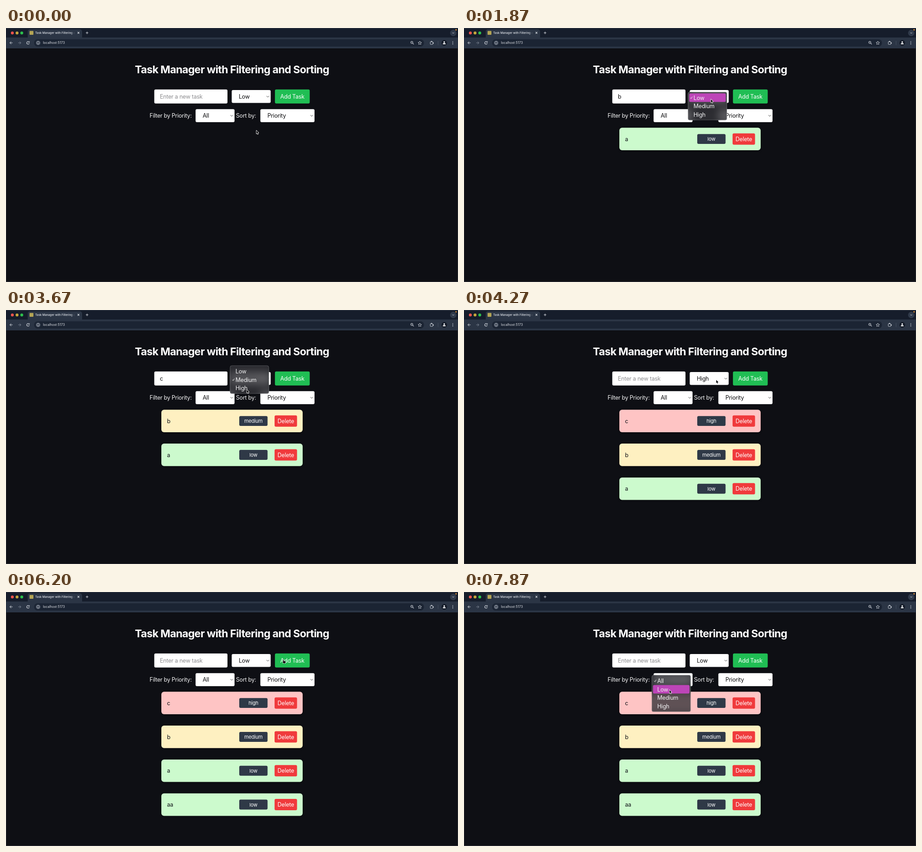
Recreate the animation shown at these times as an HTML page with a canvas. Size 998 by 561 pixels, loop 8 s.

```html
<!DOCTYPE html>
<html lang="en">
<head>
<meta charset="utf-8">
<title>Task Manager</title>
<style>
html, body { margin: 0; width: 998px; height: 561px; overflow: hidden; background: #0e0f14; }
canvas { display: block; }
</style>
</head>
<body>
<canvas id="stage" width="998" height="561"></canvas>
<script>
const canvas = document.getElementById('stage');
const ctx = canvas.getContext('2d');
const LOOP = 8000, STEP = 1000 / 15;
const LEVELS = ['Low', 'Medium', 'High'];
const CARD_COLORS = ['#ccfacd', '#fef0c1', '#fec4c4'];
const ROW = 18.7, MENU_Y = 154;
const INK = '#d3d7de', BAR = '#2b3545';

// Each task is typed, given a priority from the menu, then added
const tasks = [
  { name: 'a', level: 0, type: 600, add: 1067, hit: { x: 606, y: 158 } },
  { name: 'b', level: 1, type: 1600, open: 1800, over: 2067, pick: 2133, add: 2533,
    aim: { x: 545, y: 157 }, hit: { x: 605.5, y: 158.5 } },
  { name: 'c', level: 2, type: 3200, open: 3400, over: 3600, pick: 3733, add: 4067,
    aim: { x: 531.5, y: 157 }, hit: { x: 610, y: 153 } },
  { name: 'aa', level: 0, type: 4667, open: 5000, over: 5533, pick: 5800, add: 6133,
    aim: { x: 532.5, y: 163.6 }, hit: { x: 612.5, y: 149 } }
];
const start = { x: 552.8, y: 226 };
const menus = [], stops = [];

function stop(at, travel, x, y) {
  stops.push({ at, travel, x, y });
}

let lastAdd = 133, lastLevel = 0;
for (const k of tasks) {
  stop(lastAdd + 400, 330, 455, 156);
  if (k.open) {
    menus.push({ from: k.open, to: k.pick, x: 494.5, y: MENU_Y, checked: lastLevel, items: LEVELS });
    stop(k.open, 200, k.aim.x, k.aim.y);
    stop(k.over, 200, k.aim.x, MENU_Y + 3 + ROW * (k.level - lastLevel));
  }
  stop(k.add - 133, 265, k.hit.x, k.hit.y);
  lastAdd = k.add;
  lastLevel = k.level;
}
stop(6533, 330, 683, 192);
stop(7400, 800, 475, 192);
stop(7867, 200, 453.5, 216);
menus.push({ from: 7533, to: LOOP + 500, x: 414.5, y: 196.3, checked: 0, items: ['All', ...LEVELS] });

function pointerAt(t) {
  return stops.reduce((p, s) => {
    const u = Math.min(1, Math.max(0, 1 + (t - s.at) / s.travel));
    const e = u * u * (3 - 2 * u);
    return { x: p.x + (s.x - p.x) * e, y: p.y + (s.y - p.y) * e };
  }, start);
}

function entryAt(t) {
  const k = tasks.find(task => task.add > t);
  return k && t >= k.type ? k.name.slice(0, 1 + Math.round((t - k.type) / STEP)) : '';
}

function levelAt(t) {
  const k = tasks.filter(task => task.pick <= t).pop();
  return k ? k.level : 0;
}

function shape(x, y, w, h, r) {
  ctx.beginPath();
  ctx.roundRect(x, y, w, h, r);
}

function box(x, y, w, h, r, color) {
  shape(x, y, w, h, r);
  ctx.fillStyle = color;
  ctx.fill();
}

function dot(x, y, r, color) {
  ctx.beginPath();
  ctx.arc(x, y, r, 0, 7);
  ctx.fillStyle = color;
  ctx.fill();
}

function line(points, color, width = 1, close = false) {
  ctx.beginPath();
  points.forEach(([x, y]) => ctx.lineTo(x, y));
  if (close) ctx.closePath();
  ctx.strokeStyle = color;
  ctx.lineWidth = width;
  ctx.stroke();
}

function ring(x, y, r, color, width = 1, from = 0, to = Math.PI * 2) {
  ctx.beginPath();
  ctx.arc(x, y, r, from, to);
  ctx.strokeStyle = color;
  ctx.lineWidth = width;
  ctx.stroke();
}

function chevron(x, y, r, color) {
  line([[x - r, y - r / 2], [x, y + r / 2], [x + r, y - r / 2]], color);
}

// A plus sign, or a cross when turned
function plus(x, y, r, turn, color) {
  ctx.save();
  ctx.translate(x, y);
  ctx.rotate(turn);
  line([[-r, 0], [r, 0]], color);
  line([[0, -r], [0, r]], color);
  ctx.restore();
}

// Text placed by the middle of its capitals
function text(s, x, cy, color, { size = 12.5, weight = 400, align = 'left', gap = -0.22 } = {}) {
  ctx.font = `${weight} ${size}px Inter, "Liberation Sans", sans-serif`;
  ctx.letterSpacing = gap + 'px';
  ctx.textAlign = align;
  ctx.fillStyle = color;
  ctx.fillText(s, x, cy + size * 0.364);
}

function tabStrip() {
  box(0, 0, 998, 21, 0, '#161d2b');
  box(0, 0, 998, 1, 0, '#343b48');
  ['#f2544d', '#c5a63c', '#2cc04d'].forEach((c, i) => dot(14 + i * 10.4, 11, 3.2, c));
  box(48, 3, 120, 20, [5, 5, 0, 0], BAR);
  box(52, 6.5, 8.5, 8.5, 1, '#b5a554');
  ctx.save();
  shape(62, 4, 88.5, 15, 0);
  ctx.clip();
  text('Task Manager with Filtering and Sorting', 64.5, 10.6, '#e3e6ec', { size: 6.25, weight: 500, gap: 0 });
  const fade = ctx.createLinearGradient(144, 0, 151, 0);
  fade.addColorStop(0, 'rgba(43,53,69,0)');
  fade.addColorStop(1, BAR);
  box(144, 4, 7, 15, 0, fade);
  ctx.restore();
  plus(160, 10.6, 2.8, Math.PI / 4, '#e3e6ec');
  plus(179, 10.7, 2.8, 0, INK);
  dot(987.5, 11, 7, '#303a4a');
  chevron(987.5, 11, 2, INK);
  dot(993.7, 4, 1.6, '#e8973a');
}

function arrowIcon(x, y, dir, color) {
  line([[x - 3 * dir, y], [x + 3 * dir, y]], color);
  line([[x, y - 3], [x + 3 * dir, y], [x, y + 3]], color);
}

function toolbar() {
  const y = 32.8;
  box(0, 21, 998, 24, 0, BAR);
  arrowIcon(11.5, y, -1, INK);
  arrowIcon(30, y, 1, '#7b8492');
  ring(48.7, y, 2.9, INK, 1.1, 0.3, 5.4);
  line([[51.7, y - 3.5], [51.7, y - 1.1], [49.3, y - 1.1]], INK);
  box(62, 25, 861, 16, 8, '#1b2433');
  dot(71, y, 6, BAR);
  ring(71, y, 3.4, INK, 0.9);
  line([[71, y - 0.5], [71, y + 2]], INK);
  line([[71, y - 2.2], [71, y - 1.3]], INK);
  text('localhost:5173', 81.5, y, '#e0e3e8', { size: 7.2, gap: 0 });

  ring(896, y - 1, 2.5, INK);
  line([[897.9, y + 0.9], [900.4, y + 3.4]], INK, 1.1);
  line([[894.8, y - 1], [897.2, y - 1]], INK, 0.8);
  const star = Array.from({ length: 10 }, (_, i) => {
    const a = i * Math.PI / 5 - Math.PI / 2, r = i % 2 ? 1.9 : 4;
    return [913.7 + r * Math.cos(a), y + 0.3 + r * Math.sin(a)];
  });
  line(star, INK, 0.9, true);
  shape(936.8, y - 2.4, 5.7, 5.8, 0.6);
  ctx.stroke();
  dot(939.6, y - 3.1, 1.2, INK);
  dot(943.2, y + 0.4, 1.2, INK);
  box(953.5, 28.5, 1, 9, 0, '#465161');
  dot(967.6, y, 6.2, '#141b28');
  dot(967.6, y - 1.8, 1.7, '#eef0f3');
  box(964.5, y + 0.5, 6.2, 2.8, [2, 2, 0.5, 0.5], '#eef0f3');
  for (let d = -2.8; d < 3; d += 2.8) dot(986.5, y + d, 0.85, INK);
}

function select(x, y, w, label) {
  box(x, y, w, 28.6, 3, '#fff');
  text(label, x + 15.6, y + 14.4, '#0b0b0d');
  chevron(x + w - 6.3, y + 14.4, 2.8, '#444');
}

function button(label, x, y, w, h, color, size = 12.5) {
  box(x, y, w, h, 3, color);
  text(label, x + w / 2, y + h / 2, '#fff', { size, align: 'center' });
}

function card(task, i) {
  const y = 220.3 + i * 74.8;
  ctx.save();
  ctx.shadowColor = 'rgba(0,0,0,.5)';
  ctx.shadowBlur = 4;
  ctx.shadowOffsetY = 1;
  box(343, y, 312, 49.7, 6, CARD_COLORS[task.level]);
  ctx.restore();
  text(task.name, 355.5, y + 25, '#0e1116');
  button(LEVELS[task.level].toLowerCase(), 515, y + 13.9, 62.5, 21.9, '#2f3947', 11);
  button('Delete', 593, y + 12.4, 49.6, 25, '#f03a3c');
}

function page(t) {
  text('Task Manager with Filtering and Sorting', 499, 91, '#fff',
    { size: 23.4, weight: 700, align: 'center', gap: -0.65 });
  box(327.4, 135.8, 161.6, 31, 3, '#fff');
  const entry = entryAt(t);
  text(entry || 'Enter a new task', 339.8, 151.5, entry ? '#0b0b0d' : '#8d8d90');
  select(498.4, 137, 86, LEVELS[levelAt(t)]);
  button('Add Task', 593.8, 135.8, 76.8, 31, '#20be54');
  text('Filter by Priority:', 317, 193.8, '#f4f4f5');
  select(418.6, 179.3, 86, 'All');
  text('Sort by:', 507.8, 193.8, '#f4f4f5');
  select(561.6, 179.3, 119.6, 'Priority');
  tasks.filter(k => k.add <= t).sort((a, b) => b.level - a.level).forEach(card);
}

function menu(m, t, p) {
  const top = m.y - 12.7 - m.checked * ROW, w = 86, h = m.items.length * ROW + 6;
  // Frosted backdrop
  ctx.save();
  shape(m.x, top, w, h, 4);
  ctx.clip();
  ctx.filter = 'blur(9px)';
  ctx.drawImage(canvas, 0, 0);
  ctx.filter = 'none';
  box(m.x, top, w, h, 0, 'rgba(47,48,53,.77)');
  ctx.restore();
  shape(m.x + 0.4, top + 0.4, w - 0.8, h - 0.8, 4);
  ctx.strokeStyle = 'rgba(140,142,148,.5)';
  ctx.lineWidth = 0.8;
  ctx.stroke();

  // The highlight blinks off just before the menu closes
  const hot = t >= m.to - STEP - 1 ? -1 : Math.floor((p.y - top - 3.2) / ROW);
  m.items.forEach((label, i) => {
    const cy = top + 12.7 + i * ROW;
    if (i === hot) box(m.x + 2.8, cy - 9.4, w - 5.4, ROW, 2.5, '#bd45b8');
    if (i === m.checked) line([[m.x + 5.4, cy], [m.x + 7, cy + 2], [m.x + 9.8, cy - 2.4]], '#f0f0f0');
    text(label, m.x + 12.3, cy, '#f3f3f4');
  });
}

function arrow() {
  ctx.lineJoin = 'round';
  line([[0.2, 0.4], [0.2, 7.4], [1.8, 6], [2.9, 8.6], [4, 8.1], [2.9, 5.6], [5, 5.4]], '#fff', 1.5, true);
  ctx.fillStyle = '#08080a';
  ctx.fill();
}

function hand() {
  for (const [grow, color] of [[0.6, '#fff'], [0, '#08080a']]) {
    ctx.beginPath();
    ctx.roundRect(-0.4 - grow, -grow, 1.5 + 2 * grow, 6 + 2 * grow, 0.8);
    ctx.roundRect(-1.2 - grow, 3.4 - grow, 6 + 2 * grow, 5 + 2 * grow, 1.8);
    ctx.fillStyle = color;
    ctx.fill();
  }
}

function beam() {
  line([[0, -4.5], [0, 4.5]], '#222');
  for (const y of [-4.8, 4.8]) line([[-1.8, y], [1.8, y]], '#222', 0.8);
}

function pointer(p, open) {
  const within = (x0, x1) => !open && p.x > x0 && p.x < x1 && p.y > 136 && p.y < 167;
  ctx.save();
  ctx.translate(p.x, p.y);
  if (within(594, 670)) hand();
  else if (within(328, 489)) beam();
  else arrow();
  ctx.restore();
}

function draw(t) {
  const p = pointerAt(t);
  box(0, 0, 998, 561, 0, '#0e0f14');
  tabStrip();
  toolbar();
  page(t);
  shape(0.2, 44, 997.5, 516.6, 0);
  ctx.save();
  ctx.beginPath();
  ctx.rect(0, 45, 998, 516);
  ctx.clip();
  shape(0.2, 40, 997.5, 520.6, 0);
  ctx.strokeStyle = '#44474f';
  ctx.lineWidth = 0.8;
  ctx.stroke();
  ctx.restore();
  const open = menus.find(m => t >= m.from && t < m.to);
  if (open) menu(open, t, p);
  pointer(p, open);
}

function tick(now) {
  // The picture advances at 15 steps a second
  const t = Math.floor((now % LOOP + 4) / STEP) * STEP;
  draw(Math.min(Math.round(t), LOOP - 1));
  requestAnimationFrame(tick);
}
requestAnimationFrame(tick);
</script>
</body>
</html>
```
